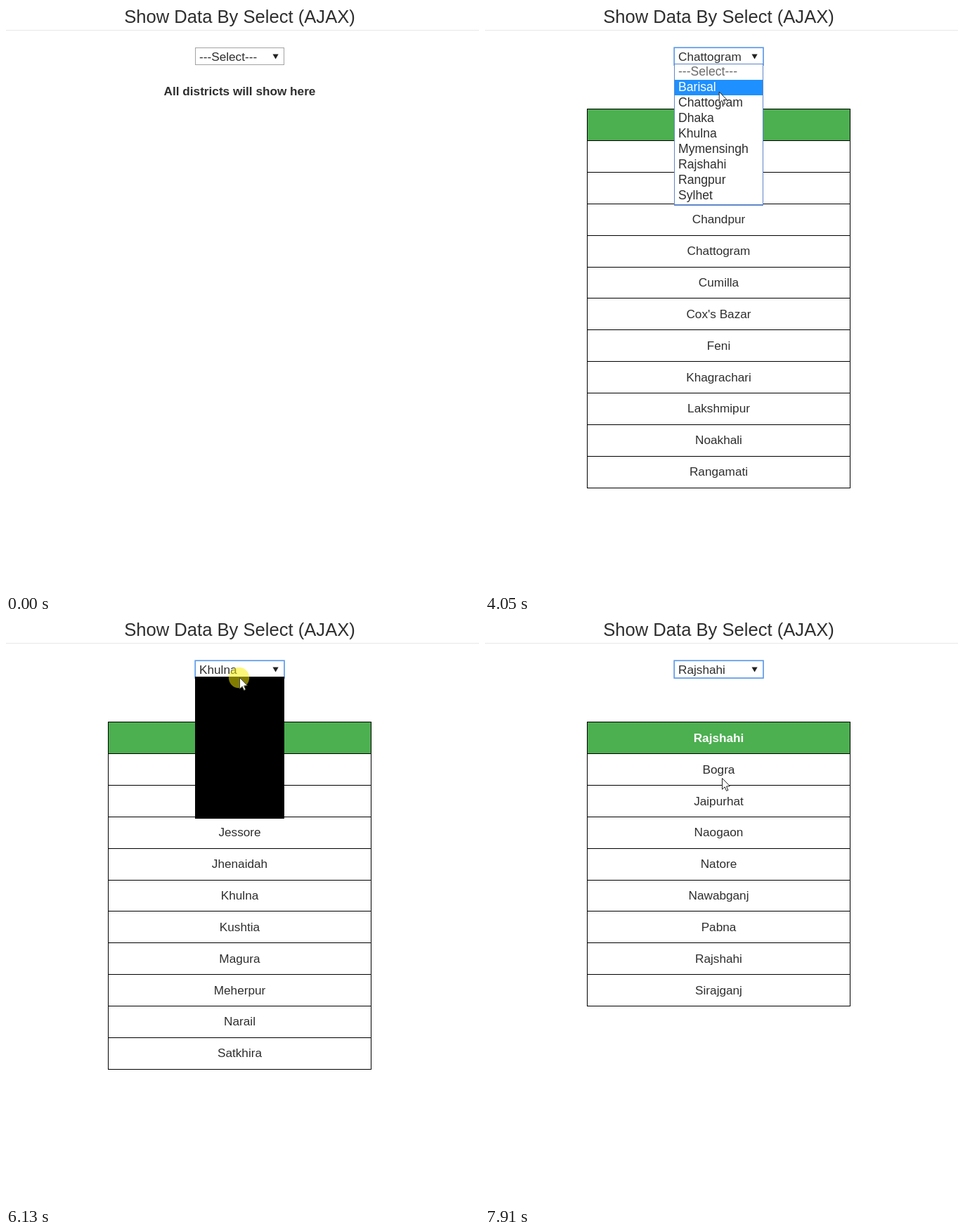
Write an HTML page with a canvas that moves like this. It is 673x832 px and loops after 8 s.

```html
<!DOCTYPE html>
<html lang="en">
<head>
<meta charset="utf-8">
<title>Show Data By Select (AJAX)</title>
<style>
html, body { margin: 0; width: 100%; height: 100%; overflow: hidden; background: #fff; }
canvas { display: block; width: 673px; height: 832px; }
</style>
</head>
<body>
<canvas id="stage" width="673" height="832"></canvas>
<script>
const ctx = document.getElementById('stage').getContext('2d');
const LOOP = 8000, TICK = 78, MID = 332.5;
const LIST_TOP = 83, ROW = 22, CELL = 44.85;
const FACE = '"Liberation Sans", Arial, sans-serif';
const INK = '#2e2e2e';

const options = ['---Select---', 'Barisal', 'Chattogram', 'Dhaka', 'Khulna',
  'Mymensingh', 'Rajshahi', 'Rangpur', 'Sylhet'];

const districts = {
  Chattogram: ['Bandarban', 'Brahmanbaria', 'Chandpur', 'Chattogram', 'Cumilla', "Cox's Bazar",
    'Feni', 'Khagrachari', 'Lakshmipur', 'Noakhali', 'Rangamati'],
  Khulna: ['Bagerhat', 'Chuadanga', 'Jessore', 'Jhenaidah', 'Khulna', 'Kushtia',
    'Magura', 'Meherpur', 'Narail', 'Satkhira'],
  Rajshahi: ['Bogra', 'Jaipurhat', 'Naogaon', 'Natore', 'Nawabganj', 'Pabna',
    'Rajshahi', 'Sirajganj']
};

// Each round: go to the box, press it, click an option, wait for its table.
const rounds = [
  { start: 140, press: 930, click: 2090, wait: 230, box: { x: 318, y: 70 }, option: { x: 313, y: 129 } },
  { start: 2720, press: 3560, click: 4740, wait: 310, box: { x: 341, y: 73 }, option: { x: 323.5, y: 176 } },
  { start: 5350, press: 6060, click: 7530, wait: 380, box: { x: 332, y: 83 }, option: { x: 337, y: 226 }, flash: 80 }
];

const rowAt = y => Math.floor((y - LIST_TOP) / ROW);

// Eased move that advances once per tick.
function glide(from, to, t, start, end, power) {
  if (t < start) return from;
  const steps = Math.round((end - start) / TICK) + 1;
  const step = Math.min(steps, Math.floor((t - start + 12) / TICK) + 1);
  const k = 1 - Math.pow(1 - step / steps, power);
  return { x: from.x + (to.x - from.x) * k, y: from.y + (to.y - from.y) * k };
}

function stateAt(t) {
  const s = { tip: { x: 330, y: 30 }, pick: 0, table: '' };
  for (const { start, press, click, wait, box, option, flash = 0 } of rounds) {
    if (t < start) break;
    s.tip = glide(s.tip, box, t, start, press - 270, 1.5);
    s.tip = glide(s.tip, option, t, press + 460, press + 850, 3.5);
    s.visible = true;
    s.focused = s.focused || t >= press;
    s.pressed = [press, click].some(at => t >= at && t < at + 230);
    const shown = press + 70, closed = click + 160;
    s.black = t >= shown && t < shown + flash;
    s.open = t >= shown + flash && t < closed;
    if (t >= closed) s.pick = rowAt(option.y);
    if (t >= click + wait) s.table = options[s.pick];
  }
  return s;
}

function rect(x, y, w, h, color) {
  ctx.fillStyle = color;
  ctx.fillRect(x, y, w, h);
}

function text(str, x, y, { size = 17.2, bold = false, color = INK, align = 'center' } = {}) {
  ctx.font = `${bold ? 'bold ' : ''}${size}px ${FACE}`;
  ctx.textAlign = align;
  ctx.fillStyle = color;
  ctx.fillText(str, x, y);
}

function polygon(points) {
  ctx.beginPath();
  points.forEach(([x, y]) => ctx.lineTo(x, y));
  ctx.closePath();
}

function drawTable(name) {
  const rows = [name, ...districts[name]];
  const line = k => Math.floor(146.85 + CELL * k);
  const top = line(0), bottom = line(rows.length);
  rect(145, top, 375, line(1) - top, '#4caf50');
  rows.forEach((row, k) => {
    rect(145, line(k), 375, 1, '#000');
    text(row, MID, Math.round(174.8 + CELL * k), k ? {} : { bold: true, color: '#fff' });
  });
  rect(145, bottom, 375, 1, '#000');
  rect(145, top, 1, bottom - top, '#000');
  rect(519, top, 1, bottom - top, '#000');
}

function drawSelect(label, focused) {
  ctx.strokeStyle = focused ? '#5e9bea' : '#a3a3a3';
  ctx.lineWidth = focused ? 1.7 : 1;
  if (focused) ctx.strokeRect(269.2, 59.2, 126.8, 24.8);
  else ctx.strokeRect(269.5, 59.5, 126, 24);
  text(label, 275, 78, { align: 'left' });
  polygon([[379.5, 68.5], [387.7, 68.5], [383.6, 75.5]]);
  ctx.fillStyle = '#222';
  ctx.fill();
}

function drawList(active) {
  rect(269, LIST_TOP - 1, 127, 202, '#5f86c8');
  rect(270, LIST_TOP, 125, 199, '#fff');
  if (active) rect(270, LIST_TOP + ROW * active, 125, ROW, '#1e90ff');
  options.forEach((name, i) => {
    const color = !i ? '#6c6c6c' : i === active ? '#fff' : INK;
    text(name, 275, LIST_TOP + 16 + ROW * i, { size: 17.6, color, align: 'left' });
  });
}

function drawPointer({ x, y }, pressed) {
  if (pressed) {
    ctx.beginPath();
    ctx.arc(x - 0.5, y + 0.5, 14.7, 0, Math.PI * 2);
    ctx.fillStyle = 'rgba(250, 240, 0, 0.52)';
    ctx.fill();
  }
  ctx.save();
  ctx.translate(x + 0.5, y + 0.5);
  polygon([[0, 0], [0, 15.8], [3.7, 12.4], [6.1, 17.9], [8.4, 16.9], [6.1, 11.5], [10.9, 11.2]]);
  ctx.fillStyle = '#fff';
  ctx.fill();
  ctx.strokeStyle = pressed ? '#4a4a38' : '#222';
  ctx.lineWidth = 1;
  ctx.stroke();
  ctx.restore();
}

function draw(t) {
  const s = stateAt(t);
  rect(0, 0, 673, 832, '#fff');
  text('Show Data By Select (AJAX)', MID, 24, { size: 25.6 });
  rect(0, 34, 673, 1, '#e8e8e8');

  if (s.table) drawTable(s.table);
  else text('All districts will show here', MID, 127, { bold: true });

  drawSelect(options[s.pick], s.focused);
  if (s.black) rect(269, LIST_TOP - 1, 127, 202, '#000');
  if (s.open) drawList(Math.max(0, rowAt(s.tip.y)) || s.pick);
  if (s.visible) drawPointer(s.tip, s.pressed);
}

const began = performance.now();
function tick() {
  draw((performance.now() - began) % LOOP);
  requestAnimationFrame(tick);
}
tick();
</script>
</body>
</html>
```
